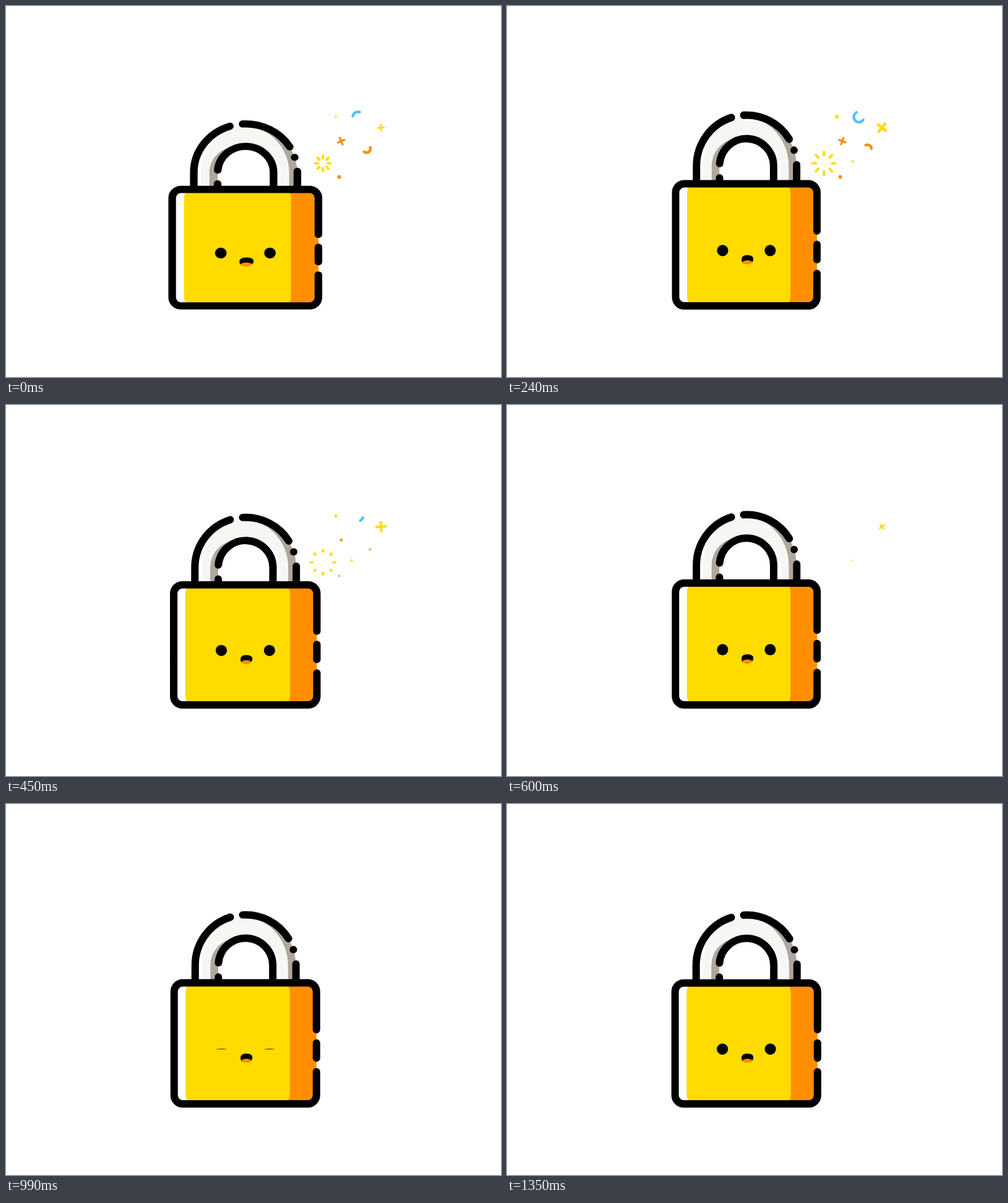
An HTML page with a canvas that plays this animation: 800x600 px, repeating every 1380 ms.

```html
<!DOCTYPE html>
<html>
<head>
<meta charset="utf-8">
<style>
html, body { margin: 0; width: 100%; height: 100%; overflow: hidden; background: #fff; }
canvas { display: block; }
</style>
</head>
<body>
<canvas id="stage" width="800" height="600"></canvas>
<script>
const ctx = document.getElementById('stage').getContext('2d');
const LOOP = 1380, STEP = 30, DEG = Math.PI / 180;
const YELLOW = '#ffdb00', ORANGE = '#ff8f00', AMBER = '#f68b0a', BLUE = '#50bfff', INK = '#000';

const arch = new Path2D('M305.7 291V261a81.5 81.5 0 0 1 163 0V291H431.2V261a44 44 0 0 0-88 0V291Z');
const archLines = new Path2D(`M305.7 290V261A81.5 81.5 0 0 1 362.5 183.3M382.5 179.6A81.5 81.5 0 0 1 456.6 217.9
  M464.5 235.6h.01M468.7 259V290M343.4 257A44 44 0 0 1 431.2 260.5V290M343.2 280V290`);
const bodyLines = new Path2D(`M501.8 365V303.4a14 14 0 0 0-14-14H285.7a14 14 0 0 0-14 14V471a14 14 0 0 0 14 14
  H487.8a14 14 0 0 0 14-14V433M501.8 386.5V411`);
const mouth = new Path2D(`M379 411C379 405.5 383 403.8 388.5 403.8S398.2 405.5 398.2 410
  C398.2 415 394 418 388.5 418S379 416 379 411Z`);

const clamp = (v, a = 0, b = 1) => Math.min(b, Math.max(a, v));
const progress = (t, start, end) => clamp((t - start) / (end - start));

function smooth(t, start, end) {
  const u = progress(t, start, end);
  return u * u * (3 - 2 * u);
}

// Grows from nothing and shrinks back between two times
const pop = (t, start, end) => Math.sqrt(Math.max(0, Math.sin(Math.PI * progress(t, start, end))));

function at(x, y, draw) {
  ctx.save();
  ctx.translate(x, y);
  draw();
  ctx.restore();
}

function stroke(path, color, width) {
  ctx.strokeStyle = color;
  ctx.lineWidth = width;
  ctx.stroke(path);
}

function fill(path, color) {
  ctx.fillStyle = color;
  ctx.fill(path);
}

function ellipse(x, y, rx, ry, color) {
  const p = new Path2D();
  p.ellipse(x, y, rx, ry, 0, 0, 7);
  fill(p, color);
}

function box(x, y, w, h, radii, color) {
  const p = new Path2D();
  p.roundRect(x, y, w, h, radii);
  fill(p, color);
}

// Downward squash: quick release, then a damped spring
function squash(t) {
  if (t < 40) return 7.2 * (1 - t / 40);
  const u = t - 40;
  return -9.4 * Math.exp(-0.0034 * u) * Math.sin(2 * Math.PI * u / 460);
}

function shackle() {
  ctx.save();
  ctx.clip(arch);
  fill(arch, '#aea79c');
  ctx.translate(-13, 0);
  ctx.clip(arch);
  fill(arch, '#fff');
  ctx.translate(24, 0);
  fill(arch, '#f6f7f3');
  ctx.restore();
  stroke(archLines, INK, 12);
}

function face(t) {
  const open = clamp(Math.abs(t - 990) / 100, 0.05);
  for (const x of [348.2, 425.6]) ellipse(x, 396.3, 9.1, 9.1 * open, INK);
  at(388.5, 411, () => {
    ctx.scale(1.16 - 0.16 * progress(t, 0, 90), 1);
    ctx.translate(-388.5, -411);
    fill(mouth, INK);
    ctx.clip(mouth);
    ellipse(388.5, 418, 9.5, 6, ORANGE);
  });
}

function lock(t) {
  const d = squash(t);
  at(386.75, 485, () => {
    ctx.scale(1 + d * 0.00374, 1 - d / 195.6);
    ctx.translate(-386.75, -485);
    shackle();
    box(271.7, 289.4, 230.1, 195.6, 14, '#fff');
    box(430, 289.4, 71.8, 195.6, [0, 14, 14, 0], ORANGE);
    box(290.3, 289.4, 168.4, 195.6, 14, YELLOW);
    stroke(bodyLines, INK, 12);
    face(t);
  });
}

function cross(x, y, r, angle, color) {
  if (r < 0.2) return;
  at(x, y, () => {
    ctx.rotate(angle * DEG);
    const a = r * 0.78;
    stroke(new Path2D(`M${-a} 0H${a}M0 ${-a}V${a}`), color, r * 0.44);
  });
}

function curl(x, y, r, tail, head, color) {
  const p = new Path2D();
  p.arc(x, y, r, tail * DEG, head * DEG, head < tail);
  stroke(p, color, 4.3);
}

function burst(t) {
  const outer = 20 - 7.5 * Math.exp(-t / 140), inner = 7.8 + 0.021 * t;
  if (inner > outer) return;
  at(512.3, 254.3, () => {
    const ray = new Path2D(`M${inner} 0H${outer}`);
    for (let i = 0; i < 8; i++) {
      stroke(ray, YELLOW, 3.8);
      ctx.rotate(45 * DEG);
    }
  });
}

function dot(x, y, r, color) {
  ellipse(x, y, r, r, color);
}

function confetti(t) {
  const late = pop(t, -90, 680), early = pop(t, -280, 500);
  const spin = -0.2 * t, rush = Math.exp(-t / 110);
  burst(t);
  dot(533.2, 179, 3.1 * pop(t, -70, 600), YELLOW);
  dot(558.6, 251.5, 2 * pop(t, -10, 690), YELLOW);
  dot(538.6, 276.5, 3.2 * early, ORANGE);
  cross(606, 196.8, 10.4 * late, spin - 4, YELLOW);
  cross(541.8, 218.5, 7.8 * early, spin + 68, AMBER);
  if (t < 540) curl(568.8, 179.5, 8.4, -70 - 275 * smooth(t, 120, 570), -345 + 175 * rush, BLUE);
  if (t < 480) {
    ctx.globalAlpha = 1 - progress(t, 400, 520);
    curl(582.6, 230.8, 6.4, -20 + 405 * smooth(t, 0, 400), 390 - 260 * rush, AMBER);
    ctx.globalAlpha = 1;
  }
}

function frame() {
  const t = Math.floor(performance.now() % LOOP / STEP) * STEP;
  ctx.fillStyle = '#fff';
  ctx.fillRect(0, 0, 800, 600);
  ctx.lineCap = 'round';
  lock(t);
  confetti(t);
  requestAnimationFrame(frame);
}
frame();
</script>
</body>
</html>
```
